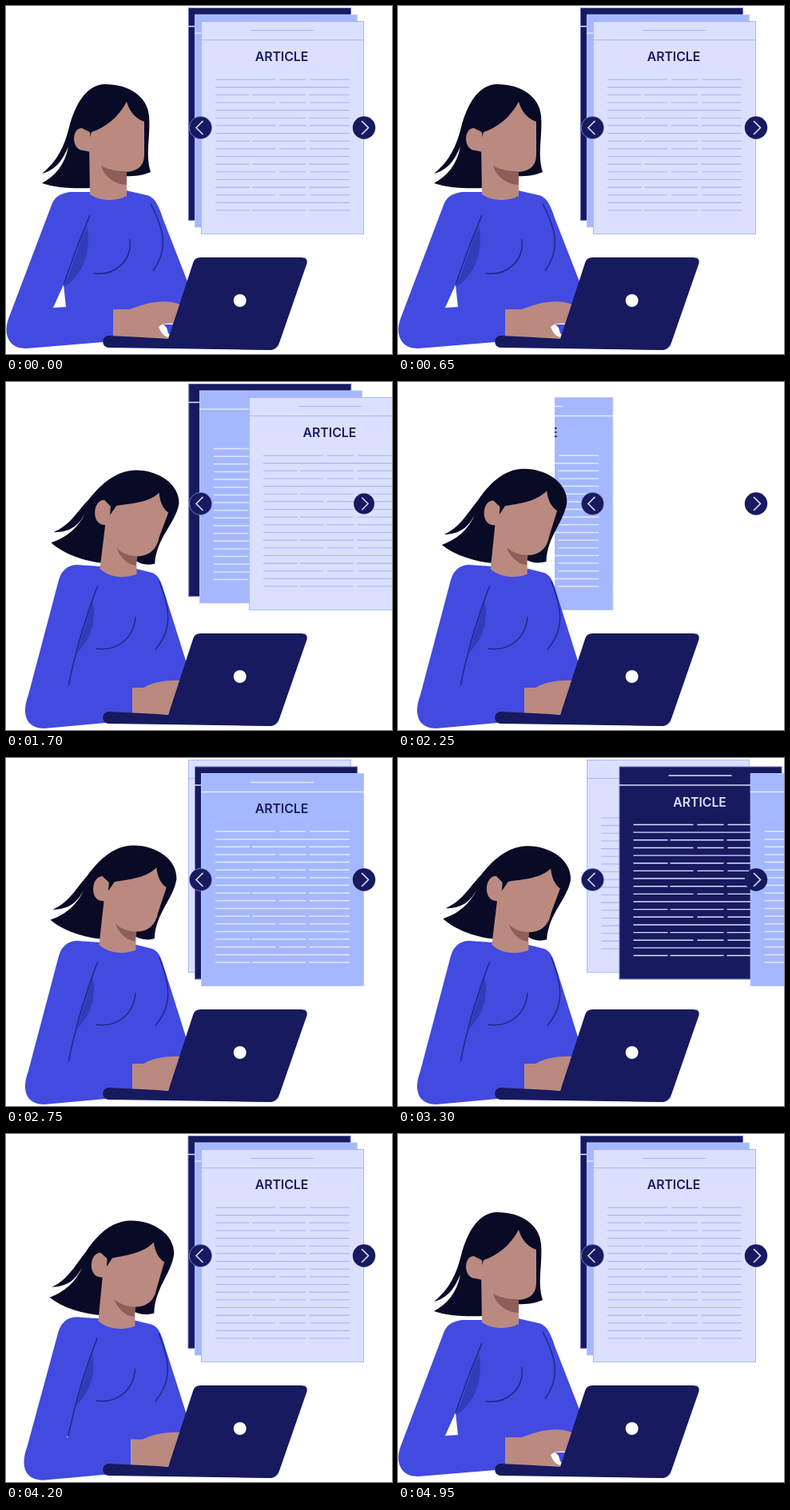
An HTML page with a canvas for the animation above (5 s loop, 483 px wide and 436 px high).

```html
<!DOCTYPE html>
<html lang="en">
<head>
<meta charset="utf-8">
<style>
  html, body { margin: 0; overflow: hidden; background: #fff; }
  canvas { display: block; }
</style>
</head>
<body>
<canvas width="483" height="436"></canvas>
<script>
const ctx = document.querySelector('canvas').getContext('2d');
const LOOP = 5000, SWAP = 1481;
const NAVY = '#171a5e', BLUE = '#424ae0', SKIN = '#ba8a80', HAIR = '#080a26', PALE = '#dce0ff', SKY = '#a5b8ff';

const PAPERS = [
  { fill: PALE, line: SKY, text: NAVY, edge: SKY, width: 1.1 },
  { fill: SKY, line: '#e2e7ff', text: NAVY, edge: '#b9c7ff', width: 1.5 },
  { fill: NAVY, line: PALE, text: PALE, edge: '#6975c0', width: 1.4 }
];

// Each shape: upright pose, leaning pose
const SHAPES = {
  body: ['M107 233L80 233C66 235 60 240 56 252L3 392C-4 412 4 430 26 429L134 420L134 380L230 385L232 358L197 268C190 247 186 240 176 237L150 231Z',
         'M118 231L88 229C76 230 70 236 66 248L28 392C19 416 25 434 48 434L158 424L158 383L230 385L229 362L197 260C193 247 190 242 183 239L163 234Z'],
  gap: ['M72 349L59 378L75 377Z', 'M78 379L77 381L78 380Z'],
  shade: ['M101 274C106 298 103 330 73 353Z', 'M108 274C114 298 106 322 89 339Z'],
  armLine: ['M105 262Q88 302 72 350', 'M115 255Q93 310 78 381'],
  chestLine: ['M155 292C158 320 136 338 110 335', 'M162 294C160 322 138 338 113 334'],
  sideLine: ['M181 248C201 285 201 308 184 332', 'M192 250C207 288 207 312 187 335'],
  hand: ['M134 380L155 380C170 374 190 368 208 371L225 376L203 416L134 415Z',
         'M158 383L172 383C181 378 196 373 218 374L225 376L203 416L158 416Z'],
  hole: ['M191 402C196 397 206 397 212 399L203 415C195 413 194 408 191 402Z',
         'M210 405C210 405 210 405 212 405L212 408C210 406 210 406 210 405Z'],
  cuff: ['M197 399L212 399L205 412C201 410 204 404 197 399Z',
         'M210 405L212 405L212 408C210 406 210 406 210 405Z'],
  face: ['M151 120C140 140 125 152 107 158L104 168L105 236C118 245 138 245 151 238L151 208C165 207 173 200 173 186L173 145C160 140 154 130 151 120Z',
         'M190 138C177 151 155 152 137 155L124 174L117 234C130 246 150 246 163 241L163 218C178 218 188 210 191 194L202 163C195 158 191 149 190 138Z'],
  chin: ['M119 200C130 206 140 207 151 207L151 224C135 224 122 212 119 200Z',
         'M138 208C145 215 155 218 164 218L162 230C150 228 141 218 138 208Z'],
  ear: ['M95 153C81 153 82 181 97 181L106 183L105 158Z', 'M122 148C107 148 106 178 121 179L128 180L130 156Z']
};
const HAIR_UP = 'M124 98C152 98 177 112 179 138C181 165 174 185 181 208C170 213 155 214 140 213L107 228C85 229 62 228 45 222C62 213 74 198 78 176C70 195 62 205 45 210C62 196 72 180 79 152C86 125 100 98 124 98Z';
const HAIR_LEAN = 'M160 107C190 107 214 125 213 150C211 175 195 195 195 222C185 225 172 224 160 222L121 226C100 226 82 222 69 217C88 208 100 195 103 173C95 192 86 202 72 203C88 192 96 172 105 153C115 130 135 107 160 107Z';
const HAIR_BLOWN = 'M161 110C190 110 216 128 215 152C211 177 188 194 186 227C178 229 168 229 160 222L122 227C98 225 72 216 56 202C74 196 90 184 99 163C90 182 78 189 59 189C80 180 88 163 103 147C115 131 135 110 161 110Z';

const cubic = p => p < .5 ? 4 * p ** 3 : 1 - 4 * (1 - p) ** 3;

function track(t, keys) {
  if (t <= keys[0][0]) return keys[0][1];
  for (let i = 1; i < keys.length; i++) {
    const [t0, a] = keys[i - 1], [t1, b] = keys[i];
    if (t < t1) return a + (b - a) * cubic((t - t0) / (t1 - t0));
  }
  return keys.at(-1)[1];
}

function mix(a, b, p) {
  const target = b.match(/-?[\d.]+/g);
  let i = 0;
  return a.replace(/-?[\d.]+/g, n => (+n + (target[i++] - n) * p).toFixed(2) + ' ');
}

function fill(path, color) {
  ctx.fillStyle = color;
  ctx.fill(new Path2D(path));
}

function stroke(path, color, width) {
  ctx.strokeStyle = color;
  ctx.lineWidth = width;
  ctx.stroke(new Path2D(path));
}

function drawPaper(x, y, paper) {
  ctx.save();
  ctx.translate(x, y);
  ctx.fillStyle = paper.fill;
  ctx.fillRect(.5, .5, 203, 266);
  ctx.strokeStyle = paper.edge;
  ctx.lineWidth = 1;
  ctx.strokeRect(.5, .5, 203, 266);
  let lines = 'M0 23.5H204M62 11.5H141';
  for (let i = 0; i < 18; i++) {
    const row = 73 + i * 9.65;
    const breaks = [[93, 98, 131, 136], [], [61, 64, 131, 135]][i % 3];
    lines += `M18 ${row}`;
    for (let j = 0; j < breaks.length; j += 2) lines += `H${breaks[j]}M${breaks[j + 1]} ${row}`;
    lines += 'H186';
  }
  stroke(lines, paper.line, paper.width);
  ctx.fillStyle = paper.text;
  ctx.font = '600 15.8px Inter, Arial, sans-serif';
  ctx.textAlign = 'center';
  ctx.fillText('ARTICLE', 101, 50);
  ctx.restore();
}

function drawPapers(t) {
  const deck = t < 2150 ? 0 : t < 2150 + SWAP ? 1 : 2;
  const quart = ms => 4.28e-9 * Math.max(0, ms) ** 4;
  ctx.save();
  ctx.beginPath();
  ctx.rect(196, 0, 287, 436);
  ctx.clip();
  for (let i = 2; i >= 0; i--) {
    let dx = 0;
    if (deck < 2) dx += quart(t - 1357 - SWAP * deck - [0, 151, 254][i]);
    if (deck > 0) dx -= quart(2703 + SWAP * (deck - 1) + 60 * i - t);
    drawPaper(244 - 8 * i + dx, 19 - 8.5 * i, PAPERS[(i + deck % 2) % 3]);
  }
  ctx.restore();
}

function drawArrow(x, dir, scale) {
  ctx.save();
  ctx.translate(x, 152.5);
  ctx.scale(scale, scale);
  ctx.beginPath();
  ctx.arc(0, 0, 14.2, 0, 7);
  ctx.fillStyle = NAVY;
  ctx.fill();
  if (dir < 0) {
    ctx.strokeStyle = SKY;
    ctx.lineWidth = .6;
    ctx.stroke();
  }
  stroke(`M${-3 * dir} -8.5L${5.5 * dir} 0L${-3 * dir} 8.5`, PALE, 1.6);
  ctx.restore();
}

function drawWoman(t) {
  const lean = track(t, [[710, 0], [1310, 1], [4050, 1], [4650, 0]]);
  const head = track(t, [[620, 0], [1180, 1], [1700, 1.04], [2250, .9], [3300, 1.03], [4050, .93], [4640, 0]]);
  const blow = track(t, [[1000, 0], [1700, 1]]);
  const body = name => mix(...SHAPES[name], lean);
  const skull = name => mix(...SHAPES[name], head);

  fill(mix(HAIR_UP, mix(HAIR_LEAN, HAIR_BLOWN, blow), head), HAIR);
  fill(body('body'), BLUE);
  fill(body('gap'), '#fff');
  fill(body('shade'), '#343bb8');
  for (const name of ['armLine', 'chestLine', 'sideLine']) stroke(body(name), '#20267e', 1.4);
  fill(skull('face'), SKIN);
  fill(skull('ear'), SKIN);
  fill(skull('chin'), '#8e5f5a');
  fill(body('hand'), SKIN);
  fill(body('hole'), '#fff');
  fill(body('cuff'), BLUE);
}

function drawLaptop() {
  fill('M128 413L210 417L335 424L333 431L128 428C119 427 119 414 128 413Z', NAVY);
  fill('M243 315H369Q379 315 376 324L342 422Q339 431 330 431L200 428L203 417L234 322Q236 315 243 315Z', NAVY);
  ctx.beginPath();
  ctx.arc(292.7, 369, 8, 0, 7);
  ctx.fillStyle = '#fff';
  ctx.fill();
}

function frame(now) {
  const t = now % LOOP;
  ctx.fillStyle = '#fff';
  ctx.fillRect(0, 0, 483, 436);
  drawPapers(t);
  const press = start => Math.max(0, 1 - Math.abs(t - start) / 120);
  drawArrow(243.5, -1, 1);
  drawArrow(448, 1, 1 - .1 * (press(1690) + press(1690 + SWAP)));
  drawWoman(t);
  drawLaptop();
  requestAnimationFrame(frame);
}
requestAnimationFrame(frame);
</script>
</body>
</html>
```
